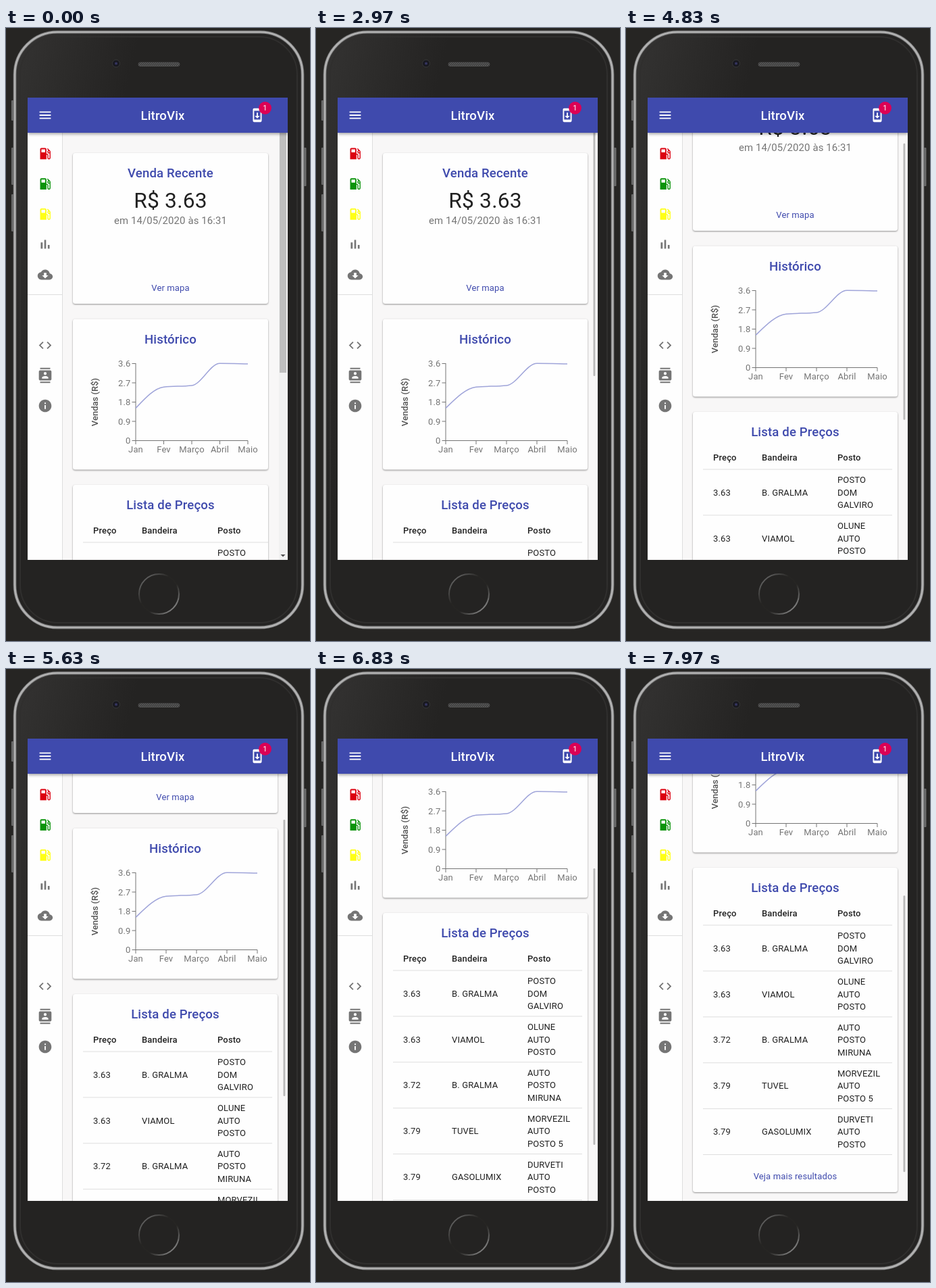
Animation, 450 px wide and 907 px high, one loop 8000 ms. Source, as an HTML page:

```html
<!DOCTYPE html>
<html lang="pt">
<head>
<meta charset="utf-8">
<style>
  html, body { margin: 0; width: 100%; height: 100%; overflow: hidden; background: #262523; }
  svg { display: block; font-family: Roboto, sans-serif; }
  .card { fill: #fefefe; filter: drop-shadow(0 1px .8px rgba(0,0,0,.42)); }
  .bar { filter: drop-shadow(0 2px 2px rgba(0,0,0,.35)); }
</style>
</head>
<body>
<svg id="stage" width="450" height="907" viewBox="0 0 450 907"></svg>
<script>
const BLUE = '#3f4aad', GREY = '#757575', INK = '#212121';

const rect = (x, y, w, h, fill, more = '') =>
  `<rect x="${x}" y="${y}" width="${w}" height="${h}" fill="${fill}" ${more}/>`;
const line = (x1, y1, x2, y2, color) =>
  `<path d="M${x1} ${y1}L${x2} ${y2}" stroke="${color}"/>`;
const text = (x, y, str, size, fill, anchor = 'start', weight = 400, spacing = .14) =>
  `<text x="${x}" y="${y}" font-size="${size}" fill="${fill}" text-anchor="${anchor}" font-weight="${weight}" letter-spacing="${spacing}">${str}</text>`;
const icon = (cx, cy, fill, d) =>
  `<path transform="translate(${cx - 11.2} ${cy - 11.2}) scale(.932)" fill="${fill}" d="${d}"/>`;

const icons = {
  menu: 'M3 18h18v-2H3v2zm0-5h18v-2H3v2zm0-7v2h18V6H3z',
  pump: 'M19.77 7.23l.01-.01-3.72-3.72L15 4.56l2.11 2.11c-.94.36-1.61 1.26-1.61 2.33 0 1.38 1.12 2.5 2.5 2.5.36 0 .69-.08 1-.21v7.21c0 .55-.45 1-1 1s-1-.45-1-1V14c0-1.1-.9-2-2-2h-1V5c0-1.1-.9-2-2-2H6c-1.1 0-2 .9-2 2v16h10v-7.5h1.5v5c0 1.38 1.12 2.5 2.5 2.5s2.5-1.12 2.5-2.5V9c0-.69-.28-1.32-.73-1.77zM12 10H6V5h6v5zm6 0c-.55 0-1-.45-1-1s.45-1 1-1 1 .45 1 1-.45 1-1 1z',
  chart: 'M5 9.2h3V19H5zM10.6 5h2.8v14h-2.8zm5.6 8H19v6h-2.8z',
  cloud: 'M19.35 10.04C18.67 6.59 15.64 4 12 4 9.11 4 6.6 5.64 5.35 8.04 2.34 8.36 0 10.91 0 14c0 3.31 2.69 6 6 6h13c2.76 0 5-2.24 5-5 0-2.64-2.05-4.78-4.65-4.96zM17 13l-5 5-5-5h3V9h4v4h3z',
  code: 'M9.4 16.6L4.8 12l4.6-4.6L8 6l-6 6 6 6 1.4-1.4zm5.2 0l4.6-4.6-4.6-4.6L16 6l6 6-6 6-1.4-1.4z',
  contacts: 'M20 0H4v2h16V0zM4 24h16v-2H4v2zM20 4H4c-1.1 0-2 .9-2 2v12c0 1.1.9 2 2 2h16c1.1 0 2-.9 2-2V6c0-1.1-.9-2-2-2zm-8 2.75c1.24 0 2.25 1.01 2.25 2.25s-1.01 2.25-2.25 2.25S9.75 10.24 9.75 9 10.76 6.75 12 6.75zM17 17H7v-1.5c0-1.67 3.33-2.5 5-2.5s5 .83 5 2.5V17z',
  info: 'M12 2C6.48 2 2 6.48 2 12s4.48 10 10 10 10-4.48 10-10S17.52 2 12 2zm1 15h-2v-6h2v6zm0-8h-2V7h2v2z',
  update: 'M17 1.01L7 1c-1.1 0-2 .9-2 2v18c0 1.1.9 2 2 2h10c1.1 0 2-.9 2-2V3c0-1.1-.9-1.99-2-1.99zM17 19H7V5h10v14zm-1-6h-3V8h-2v5H8l4 4 4-4z'
};

const rows = [
  ['3.63', 'B. GRALMA', 'POSTO DOM GALVIRO'],
  ['3.63', 'VIAMOL', 'OLUNE AUTO POSTO'],
  ['3.72', 'B. GRALMA', 'AUTO POSTO MIRUNA'],
  ['3.79', 'TUVEL', 'MORVEZIL AUTO POSTO&#160;5'],
  ['3.79', 'GASOLUMIX', 'DURVETI AUTO POSTO']
];

function chart(step) {
  const ys = [562.5, 531.2, 529, 496.3, 497], slopes = [-44, -4.6, -4.6, 0, .8];
  let curve = `M192 ${ys[0]}`, out = '';
  for (let i = 0; i < 5; i++) {
    const x = 192 + step * i, y = 496.5 + 28.5 * i;
    if (i) curve += `C${x - step * 2 / 3} ${ys[i - 1] + slopes[i - 1] / 3} ${x - step / 3} ${ys[i] - slopes[i] / 3} ${x} ${ys[i]}`;
    out += line(186.5, y, 192, y, GREY) + line(x, 610.5, x, 616, GREY)
      + text(184.5, y + 4.6, ['3.6', '2.7', '1.8', '0.9', '0'][i], 13, GREY, 'end')
      + text(x, 627.5, ['Jan', 'Fev', 'Março', 'Abril', 'Maio'][i], 13, GREY, 'middle');
  }
  return out + line(192, 496, 192, 611, GREY) + line(192, 610.5, 192 + step * 4, 610.5, GREY)
    + `<g transform="translate(136 553.5) rotate(-90)">${text(0, 0, 'Vendas (R$)', 13, '#555', 'middle', 500, 0)}</g>`
    + `<path class="curve" d="${curve}" fill="none" stroke="#9fa4d9" stroke-width="1.5" pathLength="1"/>`;
}

function page(width, step) {
  const mid = 99 + width / 2, right = Math.min(394, 99 + width);
  const card = (y, h) => rect(99, y, width, h, '#fefefe', 'rx="3.5" class="card"');
  const title = (y, str) => text(mid, y, str, 18.6, BLUE, 'middle', 500);
  let out = card(185, 223) + card(430.5, 223) + card(676, 480)
    + title(221, 'Venda Recente') + title(467, 'Histórico') + title(712, 'Lista de Preços')
    + text(mid, 266, 'R$ 3.63', 31.7, INK, 'middle', 400, .23)
    + text(mid, 290, 'em 14/05/2020 às 16:31', 14.9, GREY, 'middle')
    + text(mid, 389, 'Ver mapa', 13, BLUE, 'middle')
    + text(mid, 1137, 'Veja mais resultados', 13, BLUE, 'middle')
    + chart(step);
  ['Preço', 'Bandeira', 'Posto'].forEach((s, i) => out += text([129, 201, 313][i], 748, s, 13, INK, 'start', 500));
  out += line(114, 761, right, 761, '#dedede');
  rows.forEach(([price, brand, station], i) => {
    const y = 761 + 67.9 * i;
    out += text(129, y + 38.6, price, 13, INK) + text(201, y + 38.6, brand, 13, INK)
      + line(114, y + 67.9, right, y + 67.9, '#dedede');
    station.split(' ').forEach((s, j) => out += text(313, y + 20.1 + 18.5 * j, s, 13, INK));
  });
  return out;
}

const phone = `
  <defs>
    <linearGradient id="gloss" x1="0" y1="0" x2="1" y2=".5">
      <stop offset="0" stop-color="#343332"/><stop offset=".35" stop-color="#242322"/>
    </linearGradient>
    <linearGradient id="ring" x1="0" y1="0" x2="1" y2="1">
      <stop offset=".1" stop-color="#666"/><stop offset=".4" stop-color="#262523"/>
      <stop offset=".6" stop-color="#262523"/><stop offset=".9" stop-color="#8a8a8a"/>
    </linearGradient>
    <pattern id="mesh" width="3" height="3" patternUnits="userSpaceOnUse">
      <rect width="3" height="3" fill="#3a3a3a"/><path d="M0 3L3 0" stroke="#777" stroke-width=".8"/>
    </pattern>
    <clipPath id="screen"><rect x="32" y="103" width="385" height="684"/></clipPath>
  </defs>`
  + rect(0, 0, 450, 907, '#262523')
  + [[107, 30], [177, 55], [246, 55]].map(([y, h]) => rect(8, y, 4, h, '#6b6b6b', 'rx="1"')).join('')
  + rect(440, 177, 4.5, 57, '#6b6b6b', 'rx="1"')
  + rect(13, 6, 426, 881, 'url(#gloss)', 'rx="63" stroke="#5a5a5a" stroke-width="5"')
  + rect(13, 6, 426, 881, 'none', 'rx="63" stroke="#b0b0b0" stroke-width="3.2"')
  + rect(21, 13, 410, 867, 'none', 'rx="56" stroke="#302f2e" stroke-width="2"')
  + rect(196, 51, 61, 5.5, 'url(#mesh)', 'rx="2.7" stroke="#555" stroke-width=".8"')
  + `<circle cx="163" cy="52.5" r="5.5" fill="#191920" stroke="#383838"/><circle cx="163" cy="52.5" r="2" fill="#34345e"/>
     <circle cx="226.5" cy="837.5" r="29.5" fill="none" stroke="url(#ring)" stroke-width="2"/>`;

const sidebar = rect(32, 155, 51, 632, '#fefefe')
  + line(83.5, 155, 83.5, 787, '#dedede') + line(32, 394.5, 83, 394.5, '#dedede')
  + ['#dc0010', '#0c940c', '#ffff14'].map((c, i) => icon(58, 186 + 44.7 * i, c, icons.pump)).join('')
  + [['chart', 320], ['cloud', 365], ['code', 469.5], ['contacts', 514], ['info', 559]]
    .map(([name, y]) => icon(58, y, GREY, icons[name])).join('');

const header = rect(32, 103, 385, 52, BLUE, 'class="bar"')
  + icon(58, 129, '#fff', icons.menu) + icon(372, 129, '#fff', icons.update)
  + text(232, 136, 'LitroVix', 18.6, '#fff', 'middle', 500)
  + '<circle cx="383.5" cy="118.3" r="9.4" fill="#dc0055"/>'
  + text(383.3, 122.2, '1', 11, '#fff', 'middle');

const stage = document.getElementById('stage');
stage.innerHTML = phone + `<g clip-path="url(#screen)">
  ${rect(32, 103, 385, 684, '#f8f7f7')}
  <g id="wide">${page(289, 41.5)}
    ${rect(404, 155, 13, 632, '#f1f1f1')}${rect(405, 155, 10, 355, '#bfbfbf')}
    <path d="M406.5 779h7l-3.5 3.5z" fill="#505050"/></g>
  <g id="mobile"><g id="content">${page(303, 45)}</g>
    ${rect(410.5, 106, 2.8, 409, '#b9b9b9', 'id="thumb" rx="1.2"')}</g>
  ${sidebar}${header}
  <g id="status">${rect(28, 762.5, 130.5, 30, '#dee1e6', 'rx="3.5" stroke="#c4c6ca"')}
    ${text(37, 779, 'Waiting for localhost...', 11.2, '#5f6368', 'start', 400, 0)}</g>
  ${rect(32, 103, 385, 684, '#fff', 'id="blank"')}
</g>`;

const $ = id => document.getElementById(id);
const curve = document.querySelector('#mobile .curve');
const show = (id, on) => $(id).setAttribute('visibility', on ? 'visible' : 'hidden');

// time, scroll offset, speed
const keys = [[4000, 0, .09], [4370, 43, .13], [4830, 108, .128], [5630, 195, .102], [6830, 315, .085], [7970, 382, .035]];

function scrollAt(t) {
  if (t < 4000) return 0;
  let i = 0;
  while (i < keys.length - 2 && t > keys[i + 1][0]) i++;
  const [t0, a, va] = keys[i], [t1, b, vb] = keys[i + 1];
  const d = t1 - t0, u = Math.min(1, (t - t0) / d), u2 = u * u, u3 = u2 * u;
  return Math.round(a + (b - a) * (3 * u2 - 2 * u3) + d * (va * (u3 - 2 * u2 + u) + vb * (u3 - u2)));
}

function draw() {
  const t = performance.now() % 8000;
  show('wide', t < 1030);
  show('mobile', t >= 1300);
  show('status', t >= 270 && t < 1030);
  show('blank', t >= 1030 && t < 1300);

  const u = Math.min(1, Math.max(0, (t - 1480) / 1490));
  const drawn = 1 - (1 - u) ** 1.3;
  curve.setAttribute('stroke-dasharray', drawn < 1 ? `${drawn} 2` : 'none');
  curve.setAttribute('stroke-opacity', drawn ? 1 : 0);

  const s = scrollAt(t);
  $('content').setAttribute('transform', `translate(0 ${-s})`);
  $('thumb').setAttribute('y', 106 + s * .6);
  requestAnimationFrame(draw);
}
draw();
</script>
</body>
</html>
```
